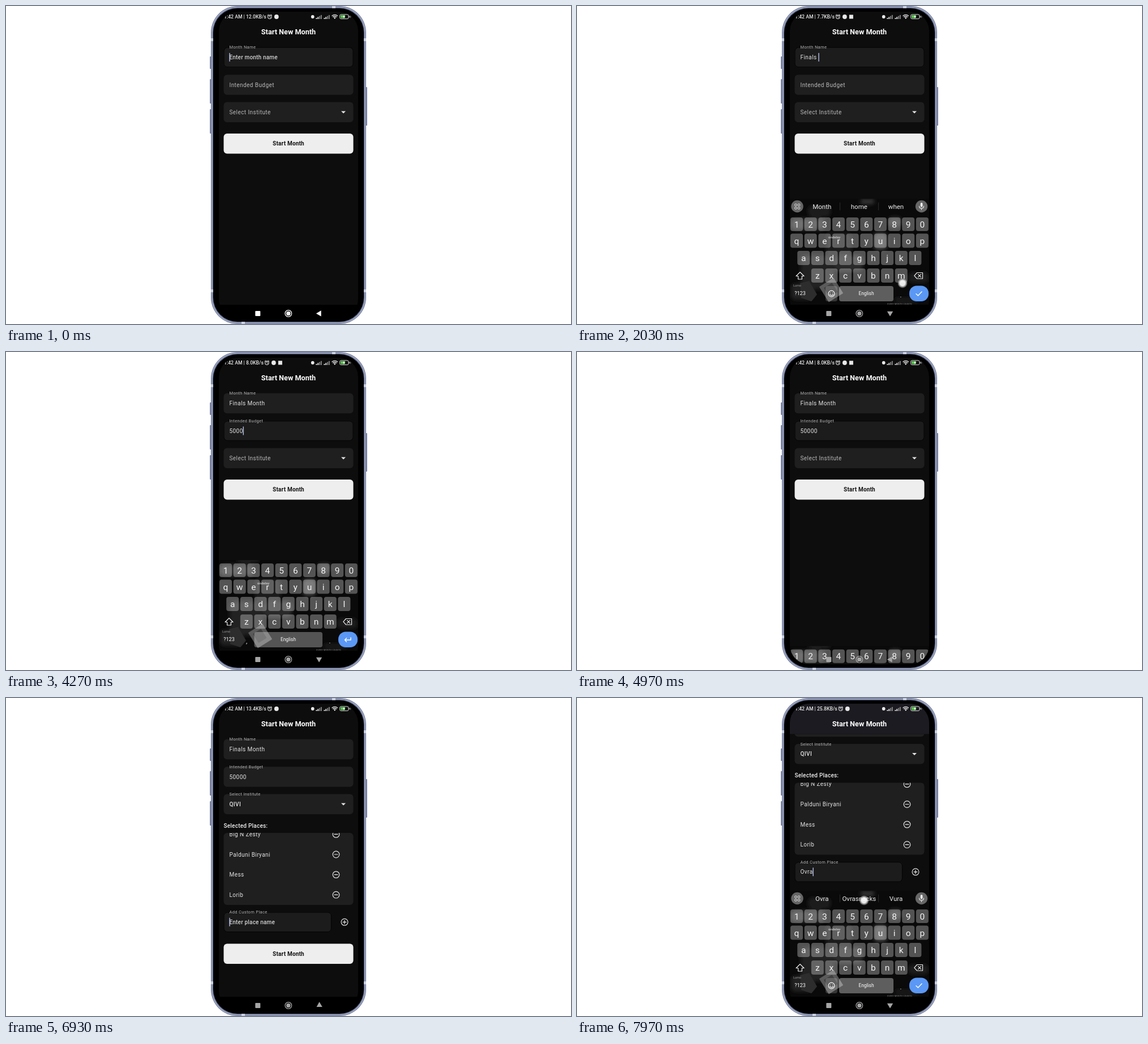
An HTML page for the animation above (8000 ms loop, 998x561 px).

```html
<!DOCTYPE html>
<html lang="en">
<head>
<meta charset="utf-8">
<title>Start New Month</title>
<style>
html, body { margin: 0; width: 100%; height: 100%; overflow: hidden; background: #fff; }
svg { display: block; width: 100%; height: 100%; }
text { font-family: Roboto, sans-serif; white-space: pre; }
</style>
</head>
<body>
<svg id="stage" viewBox="0 0 998 561">
  <defs>
    <clipPath id="screenClip"><rect x="376" y="10" width="246" height="541" rx="34"/></clipPath>
    <clipPath id="bodyClip"><rect x="376" y="63.5" width="246" height="463.5"/></clipPath>
    <clipPath id="listClip"><rect x="384.5" y="238" width="229" height="127" rx="6"/></clipPath>
    <clipPath id="boardClip"><rect id="boardArea" x="376" y="340" width="246" height="187"/></clipPath>
    <filter id="soft"><feGaussianBlur stdDeviation="3"/></filter>
    <radialGradient id="dot">
      <stop offset=".5" stop-color="#fff" stop-opacity=".92"/>
      <stop offset=".75" stop-color="#ddd" stop-opacity=".6"/>
      <stop offset="1" stop-color="#ccc" stop-opacity="0"/>
    </radialGradient>
  </defs>
</svg>
<script>
const LOOP = 8000;
const stage = document.getElementById('stage');
const boardArea = document.getElementById('boardArea');

function el(parent, tag, attrs = {}) {
  const node = document.createElementNS('http://www.w3.org/2000/svg', tag);
  set(node, attrs);
  parent.appendChild(node);
  return node;
}
function set(node, attrs) {
  for (const k in attrs) node.setAttribute(k, attrs[k]);
}
const show = (node, on) => set(node, { visibility: on ? 'inherit' : 'hidden' });
const group = (parent, attrs) => el(parent, 'g', attrs);
const rect = (parent, x, y, width, height, rx, fill, more) =>
  el(parent, 'rect', { x, y, width, height, rx, fill, ...more });
const circle = (parent, cx, cy, r, attrs) => el(parent, 'circle', { cx, cy, r, ...attrs });
const path = (parent, d, attrs) => el(parent, 'path', { d, ...attrs });
const line = (parent, d, stroke = '#eee', width = 1.2) =>
  path(parent, d, { fill: 'none', stroke, 'stroke-width': width, 'stroke-linecap': 'round', 'stroke-linejoin': 'round' });
// y is the middle of the capitals
function label(parent, x, y, str, size, attrs = {}) {
  const node = el(parent, 'text', { x, y: y + size * .356, 'font-size': size, fill: '#fff', ...attrs });
  node.textContent = str;
  return node;
}
const mid = { 'text-anchor': 'middle' };
const clamp = v => Math.max(0, Math.min(1, v));
const ramp = (t, start, dur) => clamp((t - start) / dur);
const easeOut = p => 1 - (1 - p) ** 3;
const easeBoth = p => p * p * (3 - 2 * p);

// Phone body
for (const [y, h] of [[89, 22], [129, 43], [182, 43]]) rect(stage, 360, y, 4, h, 1, '#7d86a5');
rect(stage, 634, 143, 4, 68, 1, '#7d86a5');
const shell = (inset, fill) => rect(stage, 362 + inset, inset, 274 - 2 * inset, 561 - 2 * inset, 47 - inset, fill);
shell(0, '#5d6683');
shell(.8, '#a0a9c6');
shell(2.6, '#69728f');
for (const y of [57, 500]) {
  rect(stage, 362, y, 4, 5, 0, '#c9cfe2');
  rect(stage, 632, y, 4, 5, 0, '#c9cfe2');
}
rect(stage, 576, 0, 6, 4, 0, '#c9cfe2');
rect(stage, 416, 557, 6, 4, 0, '#c9cfe2');
shell(4, '#000');

const screen = group(stage, { 'clip-path': 'url(#screenClip)' });
rect(screen, 376, 10, 246, 517, 0, '#0d0d0d');

// Form
const body = group(screen, { 'clip-path': 'url(#bodyClip)' });
const form = group(body);

function field(parent, y, width, name, hint) {
  const box = rect(parent, 384.5, y, width, 35.5, 6, '#1f1f1f');
  const rim = rect(parent, 385, y + .5, width - 1, 34.5, 6, 'none', { stroke: '#050505', 'stroke-width': 1.2 });
  const c = y + 17.7;
  const cap = label(parent, 394.5, c, name, 10, { fill: '#b9b9b9', 'letter-spacing': .43 });
  const tip = label(parent, 394.5, c, hint, 10, { fill: '#d2d2d2', 'font-weight': 500, 'letter-spacing': .18 });
  const val = label(parent, 394.5, c, '', 10, { fill: '#e4e4e4', 'letter-spacing': .43 });
  const caret = rect(parent, 394.5, c - 7.5, 1.3, 15, 0, '#c3cdfa');
  return {
    val,
    update(float, text, focus, caretOn) {
      const size = 10 - 2.5 * float;
      set(cap, { y: c - 17.7 * float + size * .356, 'font-size': size, 'letter-spacing': .43 - .1 * float });
      set(box, { fill: focus ? '#1c1c1c' : '#1f1f1f' });
      show(rim, focus);
      show(tip, focus && float === 1 && !text);
      if (val.textContent !== text) val.textContent = text;
      show(caret, focus && caretOn);
      set(caret, { x: 394.4 + (text ? val.getComputedTextLength() : 0) });
    }
  };
}
const nameField = field(form, 72.7, 229, 'Month Name', 'Enter month name');
const budgetField = field(form, 121.3, 229, 'Intended Budget', 'Enter budget amount');
const placeField = field(form, 169.5, 229, 'Select Institute', '');
set(placeField.val, { 'font-weight': 500 });
path(form, 'M592 185.5h8l-4 4z', { fill: '#e6e6e6' });

const menu = group(form);
rect(menu, 384.5, 169.5, 229, 35.5, 4, '#262626');
label(menu, 394.5, 187.2, 'QIVI', 10, { 'font-weight': 500, 'letter-spacing': .43 });

const places = group(form);
label(places, 384.5, 225, 'Selected Places:', 10, { 'font-weight': 500, 'letter-spacing': .22, fill: '#eee' });
rect(places, 384.5, 238, 229, 127, 6, '#1f1f1f');
const listBox = group(places, { 'clip-path': 'url(#listClip)' });
const list = group(listBox);
const ring = { fill: 'none', stroke: '#e0e0e0', 'stroke-width': 1.2 };
['Big N Zesty', 'Palduni Biryani', 'Mess', 'Lorib'].forEach((name, i) => {
  const y = 240.4 + i * 35.6;
  label(list, 394.5, y, name, 10, { fill: '#e4e4e4', 'letter-spacing': .43 });
  circle(list, 583, y, 5.8, ring);
  line(list, `M580 ${y}h6`);
});
const customField = field(places, 377.6, 190.5, 'Add Custom Place', 'Enter place name');
circle(places, 598, 395.3, 5.9, ring);
line(places, 'M595 395.3h6M598 392.3v6');

const button = group(form);
rect(button, 384.5, 225, 229, 35.5, 6, '#eee');
label(button, 499, 242.8, 'Start Month', 10, { ...mid, fill: '#111', 'font-weight': 600, 'letter-spacing': .2 });

// App bar and status bar
const bar = rect(screen, 376, 10, 246, 53.5, 0, '#1c1b21');
label(screen, 499, 45.5, 'Start New Month', 12.7, { ...mid, 'font-weight': 700 });
const clock = label(screen, 385, 19, '', 8.65, { 'font-weight': 500, fill: '#e8e8e8' });
const badges = group(screen);
circle(badges, 0, 19.3, 3.2, { ...ring, 'stroke-width': 1.1 });
line(badges, 'M0 17.3v2l1.4 1M-4 16.6l1.7-1.6M4 16.6l-1.7-1.6', '#e8e8e8', 1);
circle(badges, 12, 19, 3.9, { fill: '#e8e8e8' });
const badge = rect(badges, 20, 15.5, 7, 7, 0, '#e8e8e8');
circle(screen, 541.7, 19, 2.9, { fill: '#e8e8e8' });
for (const x of [547.5, 561.5])
  for (let i = 0; i < 4; i++) rect(screen, x + i * 2.8, 21 - i * 1.7, 1.8, 2 + i * 1.7, 0, i < 2 ? '#e8e8e8' : '#8c8c8c');
line(screen, 'M576 17.3q4.7-4 9.4 0M577.7 19.3q3-2.6 6 0', '#e8e8e8', 1.3);
path(screen, 'M578.8 20.6q1.9-1.5 3.8 0l-1.9 2.3z', { fill: '#e8e8e8' });
rect(screen, 589.6, 15, 15.4, 7.6, 2.2, 'none', { stroke: '#ddd', 'stroke-width': 1 });
rect(screen, 591, 16.3, 8, 5, 1, '#57c84d');
path(screen, 'M597.6 15.8l-3 3.5h2l-.8 2.6 3.2-3.6h-2z', { fill: '#fff' });
rect(screen, 605.6, 17.4, 1.3, 2.8, .6, '#ddd');
line(screen, 'M608 17.5l1 1.5-1 1.5', '#ccc', .8);

// Navigation background, keyboard, navigation icons
rect(screen, 376, 527, 246, 24, 0, '#000');
const board = group(screen, { 'clip-path': 'url(#boardClip)' });
rect(board, 376, 340, 246, 187, 0, '#0a0a0a');
const photo = group(board, { filter: 'url(#soft)' });
const blobs = [
  [378, 375, 60, 20, '#303030'], [408, 352, 40, 20, '#1c1c1c'], [500, 340, 26, 10, '#333'],
  [440, 400, 45, 40, '#1e1e1e'], [524, 400, 24, 30, '#444'], [550, 372, 24, 18, '#2e2e2e'],
  [395, 440, 60, 60, '#242424'], [455, 440, 50, 28, '#2a2a2a'], [585, 470, 36, 18, '#1c1c1c'],
  [378, 490, 40, 28, '#242424'], [560, 515, 45, 8, '#1d1d1d']
];
for (const [x, y, w, h, c] of blobs) rect(photo, x, y, w, h, 8, c);
rect(board, 434, 485, 30, 32, 1, '#6a6a6a', { transform: 'rotate(-32 449 501)', opacity: .8 });
rect(board, 440, 491, 17, 19, 1, '#3a3a3a', { transform: 'rotate(-32 449 501)', opacity: .8 });
path(board, 'M394 489l16-4 14 24-10 12-18-6z', { fill: '#2d2d2d' });
label(board, 382, 493, 'Lumo', 5.5, { fill: '#999' });
label(board, 444, 408, 'ondelay', 6, { fill: '#aaa', 'font-weight': 700 });
label(board, 548, 526, 'EVERY MONTH COUNTS', 4, { fill: '#777' });

const STEP = 24.65;
const letters = [];
function keyRow(chars, x, y, h) {
  [...chars].forEach((ch, i) => {
    const cx = x + i * STEP;
    rect(board, cx - 11, y - h / 2, 22, h, 4, '#fff', { opacity: .3 });
    const node = label(board, cx, y, ch, 15.5, { ...mid, fill: '#f4f4f4' });
    if (/[a-z]/.test(ch)) letters.push([node, ch]);
  });
}
keyRow('1234567890', 388, 385, 24);
keyRow('qwertyuiop', 388, 414, 25);
keyRow('asdfghjkl', 400.2, 444.5, 25);
keyRow('zxcvbnm', 424.8, 475.5, 25);
const shiftKey = line(board, 'M394 469.5l-7 7h3.6v5.5h6.8v-5.5h3.6z');
line(board, 'M600.5 470.5h10v10.5h-10l-4.7-5.2zM602.6 473.4l5 5M607.6 473.4l-5 5');
label(board, 394, 507, '?123', 9, mid);
label(board, 572, 510, '.', 11, mid);
rect(board, 587, 493.5, 34, 27.5, 13, '#5b98f5');

const textMode = group(board);
rect(textMode, 439, 494, 21, 27, 4, '#fff', { opacity: .18 });
rect(textMode, 463, 494, 96, 27, 4, '#fff', { opacity: .34 });
label(textMode, 511, 507.5, 'English', 8.4, mid);
circle(textMode, 449.5, 507.5, 5.4, { ...ring, stroke: '#fff' });
line(textMode, 'M447.4 506v.3M451.6 506v.3M446.6 509q2.9 3.2 5.8 0', '#fff');
line(textMode, 'M599 507.8l3.4 3.2 6.6-7', '#fff', 1.4);

const plainMode = group(board);
rect(plainMode, 438.5, 494, 120.5, 27, 4, '#fff', { opacity: .3 });
label(plainMode, 498.5, 507.5, 'English', 8.4, mid);
label(plainMode, 425, 510, ',', 11, mid);
line(plainMode, 'M609 504v4h-10.5M601.5 504.8l-3 3.2 3 3.2', '#fff', 1.4);

const strip = group(board);
for (const x of [389, 608.5]) circle(strip, x, 353.5, 10.7, { fill: '#666' });
for (const x of [384.6, 390.2])
  for (const y of [349.2, 354.8]) rect(strip, x, y, 3.5, 3.5, .9, 'none', { stroke: '#ddd', 'stroke-width': 1 });
rect(strip, 606.7, 347, 3.8, 7.6, 1.9, '#eee');
line(strip, 'M604.5 353q0 4 4 4t4-4M608.5 357v2.5', '#eee', 1.1);

const tools = group(strip);
const GREY = '#b5b5b5';
line(tools, 'M420.5 348h11v7.5l-3.5 3.5h-7.5zM428 359v-3.5h3.5M423 351.5v.4M428 351.5v.4M423.5 354.5q2 1.8 4 0', '#8a8a8a');
label(tools, 462, 353.5, 'GIF', 9, { ...mid, fill: '#777', 'font-weight': 700, 'letter-spacing': .5 });
line(tools, 'M494.5 349h8.6v10h-8.6zM496.6 352.5h4.4M496.6 355h4.4', GREY);
rect(tools, 496.4, 347, 4.8, 3, 1, GREY);
circle(tools, 535.3, 353.5, 3.2, { fill: 'none', stroke: GREY, 'stroke-width': 2.4 });
circle(tools, 535.3, 353.5, 5, { fill: 'none', stroke: GREY, 'stroke-width': 1.6, 'stroke-dasharray': '2.62 2.62' });
circle(tools, 571.8, 353.3, 5.4, { fill: GREY });
for (const [x, y] of [[568.6, 353], [570.4, 350.4], [573.4, 350.4], [575, 353]]) circle(tools, x, y, .9, { fill: '#111' });
circle(tools, 574.4, 357.6, 1.9, { fill: '#111' });

const hints = group(strip);
const words = [432.8, 498.3, 563.5].map(x => label(hints, x, 353.7, '', 11.5, { ...mid, fill: '#eee' }));
line(hints, 'M464.5 347v13M532.5 347v13', '#333', .8);

const nav = group(screen);
rect(nav, 440.3, 538, 9, 9, 1, 'currentColor');
circle(nav, 498.8, 542.4, 5.8, { fill: 'none', stroke: 'currentColor', 'stroke-width': 1.3 });
circle(nav, 498.8, 542.4, 3.7, { fill: 'currentColor' });
const back = path(nav, 'M547.8 542.4l8.8-5.2v10.4z', { fill: 'currentColor' });
const touch = circle(screen, 0, 0, 9, { fill: 'url(#dot)' });

// Each step changes part of the state from its time onward
const steps = [
  [0, { name: '', budget: '', inst: '', custom: '', focus: 1, caret: 1, upper: 0, rate: '12.0', plain: 0, words: '', badge: 0, open: 0, nav: '#fff' }],
  [700, { upper: 1 }],
  [1080, { name: 'F', upper: 0, words: 'For First From' }],
  [1450, { name: 'Fi', words: 'First Final Fine', rate: '7.7', badge: 1, nav: '#a6a6a6' }],
  [1750, { name: 'Fin', words: 'Final Find Fine' }],
  [1860, { name: 'Fina', words: 'Finals Final Finally' }],
  [1980, { name: 'Finals ', words: 'Month home when' }],
  [2090, { name: 'Finals m', words: 'Month my me' }],
  [2420, { name: 'Finals Month ', words: 'and is for' }],
  [2860, { name: 'Finals Month', focus: 2, plain: 1, words: '' }],
  [3400, { caret: 0 }],
  [3670, { caret: 1 }],
  [3780, { budget: '5' }],
  [3960, { budget: '50', rate: '8.0' }],
  [4090, { budget: '500' }],
  [4220, { budget: '5000' }],
  [4350, { budget: '50000' }],
  [4600, { caret: 0 }],
  [5300, { focus: 0 }],
  [5880, { inst: 'QIVI', open: 1, rate: '13.4', badge: 0 }],
  [6780, { focus: 4, caret: 1, plain: 0 }],
  [7330, { upper: 1 }],
  [7440, { custom: 'O', upper: 0, words: 'Of On Or', rate: '25.8' }],
  [7580, { custom: 'Ov', words: 'Over Oven Oval' }],
  [7720, { custom: 'Ovr', words: 'Over Ovra Our' }],
  [7850, { custom: 'Ovra', words: 'Ovra Ovrasnacks Vura' }]
];

// start, end, x, y, optional vertical drag
const taps = [
  [560, 720, 394, 484], [1030, 1140, 474, 450], [1400, 1510, 560, 420], [1710, 1800, 548, 480],
  [1820, 1900, 400, 450], [1920, 1990, 433, 357], [2000, 2120, 575, 489], [2360, 2480, 433, 357],
  [2780, 2900, 480, 141], [3730, 3840, 487, 389], [3930, 4000, 610, 389], [4060, 4130, 610, 389],
  [4190, 4260, 610, 389], [4320, 4390, 610, 389], [4790, 4900, 604, 508], [5230, 5350, 500, 189],
  [5780, 5900, 430, 189], [6130, 6400, 480, 330, -30], [6720, 6840, 470, 396], [7280, 7360, 394, 480],
  [7410, 7490, 585, 419], [7550, 7620, 498, 481], [7690, 7760, 461, 419], [7820, 7890, 400, 450],
  [7915, 8060, 507, 357]
];

function draw(t) {
  const s = {};
  for (const [at, change] of steps) if (t >= at) Object.assign(s, change);

  nameField.update(1, s.name, s.focus === 1, s.caret);
  budgetField.update(easeBoth(ramp(t, 2860, 160)), s.budget, s.focus === 2, s.caret);
  placeField.update(easeBoth(ramp(t, 5880, 160)), s.inst, false, 0);
  customField.update(easeBoth(ramp(t, 6760, 150)), s.custom, s.focus === 4, s.caret);

  const menuFade = ramp(t, 5350, 150) * (1 - ramp(t, 5850, 120));
  set(menu, { opacity: menuFade });
  show(places, s.open);
  set(button, { transform: `translate(0 ${s.open ? 208.5 : 0})` });
  set(list, { transform: `translate(0 ${15.6 * (1 - easeBoth(ramp(t, 6150, 270)))})` });

  const lift = easeBoth(ramp(t, 7040, 190));
  set(form, { transform: `translate(0 ${-88.5 * lift})` });
  set(bar, { opacity: lift });

  const rate = `1:42 AM | ${s.rate}KB/s`;
  if (clock.textContent !== rate) clock.textContent = rate;
  set(badges, { transform: `translate(${391 + clock.getComputedTextLength()} 0)` });
  show(badge, s.badge);

  const up = easeOut(ramp(t, 60, 290)) - easeOut(ramp(t, 4875, 280)) + easeOut(ramp(t, 6935, 270));
  set(board, { transform: `translate(0 ${212 * (1 - up)})` });
  show(board, up > .001);
  const top = s.plain ? 340 + 27 * easeBoth(ramp(t, 2900, 150)) : 340;
  set(boardArea, { y: top, height: 527 - top });
  show(textMode, !s.plain);
  show(plainMode, s.plain);
  show(strip, !s.plain);
  show(tools, !s.words);
  show(hints, s.words);
  const list3 = s.words.split(' ');
  words.forEach((node, i) => { node.textContent = list3[i] || ''; });
  for (const [node, ch] of letters) node.textContent = s.upper ? ch.toUpperCase() : ch;
  set(shiftKey, { fill: s.upper ? '#eee' : 'none' });

  const turn = ramp(t, 30, 180) - ramp(t, 4840, 120) + ramp(t, 6875, 165);
  set(nav, { color: s.nav });
  set(back, { transform: `rotate(${-90 * turn} 553 542.4)` });

  const tap = taps.find(p => t >= p[0] && t < p[1]);
  show(touch, tap);
  if (tap) {
    const [a, b, x, y, drag = 0] = tap;
    const fade = Math.min(1, (t - a) / 25 + .3, (b - t) / 30);
    set(touch, { cx: x, cy: y + drag * ramp(t, a, b - a), opacity: fade });
  }
}

function tick() {
  draw(performance.now() % LOOP);
  requestAnimationFrame(tick);
}
tick();
</script>
</body>
</html>
```
